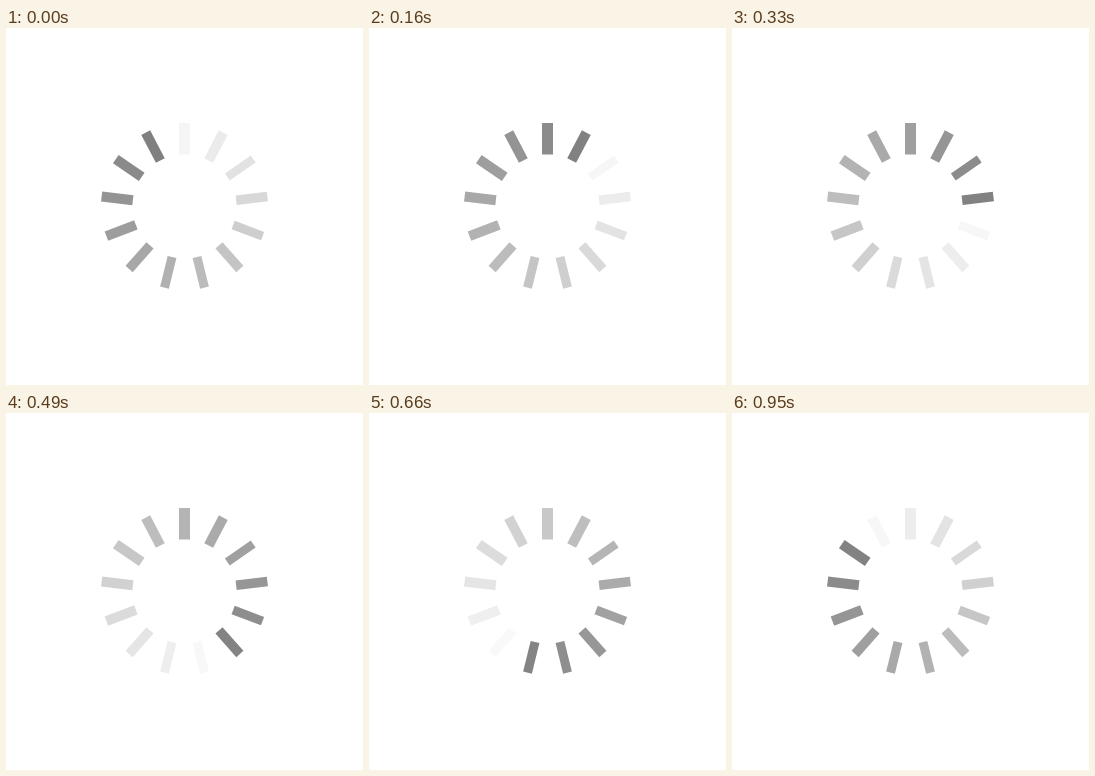
Recreate the animation shown at these times as an HTML page. Size 357x357 px, loop 1.02 s.

```html
<!DOCTYPE html>
<html lang="en">
<head>
<meta charset="utf-8">
<title>Spinner</title>
<style>
  html, body { margin: 0; height: 100%; overflow: hidden; background: #fff; }
  svg { display: block; width: 100vw; height: 100vh; }
</style>
</head>
<body>
<svg viewBox="0 0 357 357"></svg>
<script>
const LOOP = 1020, FRAMES = 31, FRAME = LOOP / FRAMES;
const CENTER = 178.5, INNER = 52, LENGTH = 31.5;
const widths = [11, 10, 8.5, 9.5, 9, 9.5, 9, 9, 9.5, 10, 10, 10, 10];
const count = widths.length;
const svg = document.querySelector('svg');

const bars = widths.map((w, i) => {
  const bar = document.createElementNS('http://www.w3.org/2000/svg', 'rect');
  const attrs = {
    x: -w / 2, y: -INNER - LENGTH, width: w, height: LENGTH,
    transform: `translate(${CENTER} ${CENTER}) rotate(${i * 360 / count})`
  };
  for (const name in attrs) bar.setAttribute(name, attrs[name]);
  return svg.appendChild(bar);
});

// Each bar turns dark in its turn, then fades to white over one loop.
function draw(now) {
  const tick = Math.floor(now % LOOP / 10) * 10 + 5;
  const time = Math.floor(tick / FRAME) * FRAME;
  bars.forEach((bar, i) => {
    const lit = (i + 1) % count / count;
    const age = (time / LOOP - lit + 1) % 1;
    const gray = Math.round(128 + 127 * age);
    bar.setAttribute('fill', `rgb(${gray},${gray},${gray})`);
  });
}

const start = performance.now();
function loop() {
  draw(performance.now() - start);
  requestAnimationFrame(loop);
}
loop();
</script>
</body>
</html>
```
